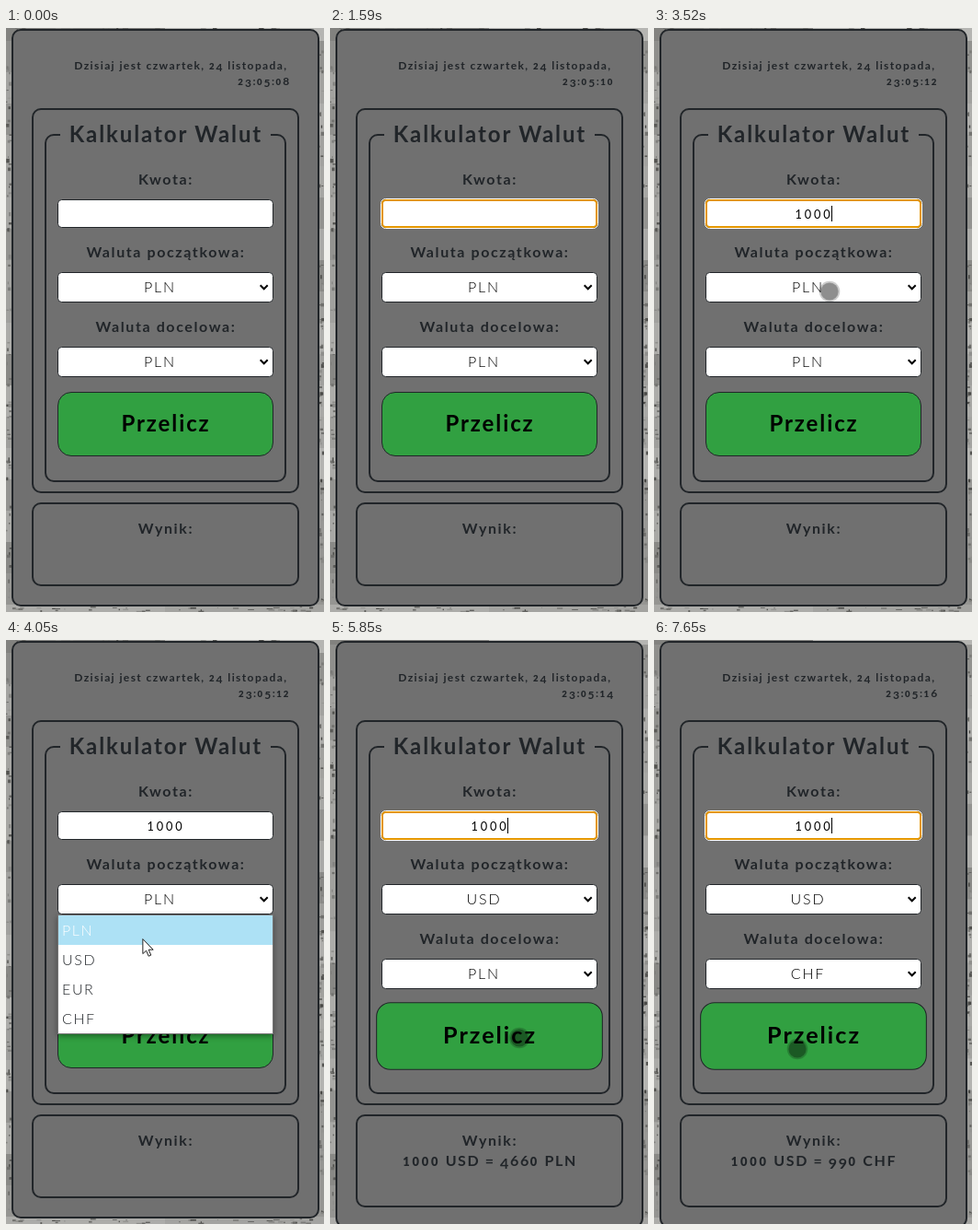
An HTML page for the animation above (8 s loop, 346 by 634 pixels).

```html
<!DOCTYPE html>
<html lang="pl">
<head>
<meta charset="utf-8">
<title>Kalkulator Walut</title>
<style>
html, body { margin: 0; height: 100%; overflow: hidden; background: #999; }
svg { display: block; width: 346px; height: 634px; }
text { font: 700 16px Raleway, Lato, sans-serif; letter-spacing: 1.6px; fill: #212529; text-anchor: middle; }
.date { font-size: 12px; letter-spacing: 1.4px; text-anchor: end; }
.big { font-size: 24px; letter-spacing: 1.9px; }
.val { font-weight: 300; fill: #000; letter-spacing: 1.9px; }
.opt { font-weight: 300; letter-spacing: 1.6px; text-anchor: start; }
/* old-style figures */
.low { font-size: .8em; font-weight: 900; letter-spacing: .22em; }
.val .low { font-weight: 400; }
.drop { baseline-shift: -.19em; }
.box { fill: none; stroke: #212529; stroke-width: 2; }
.field { fill: #fff; stroke: #212529; }
.arrow { fill: none; stroke: #000; stroke-width: 2; }
#list { filter: drop-shadow(0 2px 3px rgba(0, 0, 0, .4)); }
</style>
</head>
<body>
<svg viewBox="0 0 346 634">
  <g id="back"></g>
  <rect id="panel" class="box" style="fill:#707070" x="7" y="2" width="333" height="625" rx="9"/>
  <text class="date" x="306.5" y="45" id="date"></text>
  <text class="date" x="309.5" y="62" id="clock"></text>
  <rect class="box" x="29" y="88" width="289" height="416" rx="9"/>
  <path class="box" d="M59 116H52a9 9 0 0 0-9 9V483a9 9 0 0 0 9 9H295a9 9 0 0 0 9-9V125a9 9 0 0 0-9-9H288"/>
  <text class="big" x="174" y="124">Kalkulator Walut</text>

  <text x="174" y="170">Kwota:</text>
  <rect class="field" x="56.5" y="186.5" width="234" height="30" rx="4"/>
  <g id="focus" fill="none">
    <rect x="55.5" y="185.5" width="236" height="32" rx="5" stroke="#fff"/>
    <rect x="57" y="187" width="233" height="29" rx="3.5" stroke="#e59700" stroke-width="2"/>
  </g>
  <text class="val" x="174" y="207" id="amount"></text>
  <path id="caret" d="M.5 193v17" stroke="#000"/>

  <text x="174" y="249">Waluta początkowa:</text>
  <rect class="field" x="56.5" y="265.5" width="234" height="32" rx="4"/>
  <text class="val" x="167.5" y="287" id="from"></text>
  <path class="arrow" d="M276.7 279.3l4 4 4-4"/>

  <text x="174" y="330">Waluta docelowa:</text>
  <rect class="field" x="56.5" y="346.5" width="234" height="32" rx="4"/>
  <text class="val" x="167.5" y="368" id="to"></text>
  <path class="arrow" d="M276.7 360.3l4 4 4-4"/>

  <g id="button">
    <rect x="56.5" y="395.5" width="234" height="69" rx="14.5" fill="#31a041" stroke="#212529"/>
    <text class="big" x="174" y="438" style="fill:#000">Przelicz</text>
  </g>

  <rect id="resultBox" class="box" x="29" y="516" width="289" height="89" rx="9"/>
  <text x="174" y="549">Wynik:</text>
  <text x="174" y="571" id="result"></text>

  <g id="list">
    <rect x="56.5" y="298.5" width="234" height="129" fill="#fff" stroke="#777"/>
    <rect id="mark" x="57" width="233" height="32" fill="#ade1f5"/>
  </g>

  <g id="cursor">
    <g id="touch">
      <circle r="11.3" fill-opacity=".2"/>
      <circle r="9.6" fill-opacity=".3"/>
    </g>
    <circle id="click" cy="1" r="12" fill="#d8e85c" fill-opacity=".85"/>
    <path id="pointer" d="M.5.5v16l3.7-3.4 2.6 6 2.6-1.1-2.6-5.9h5z" fill="#fff" stroke="#222"/>
  </g>
</svg>
<script>
const LOOP = 8000;
const $ = id => document.getElementById(id);
const CODES = ['PLN', 'USD', 'EUR', 'CHF'];

// Time, x, y of the cursor
const PATH = [
  [200, 301, 300], [390, 250, 225], [590, 250, 222], [850, 154, 207],
  [2180, 154, 306], [2320, 170, 311], [2600, 247, 292], [2980, 191, 286],
  [3650, 191, 286], [4320, 125, 345], [4600, 125, 347], [4920, 125, 347],
  [5350, 206, 432], [5850, 206, 432], [6200, 180, 364], [6400, 180, 364],
  [6900, 122, 486], [7050, 122, 486], [7250, 124, 492], [7510, 124, 492], [7640, 156, 444]
];

const figures = s => s
  .replace(/[012]/g, '<tspan class="low">$&</tspan>')
  .replace(/[34579]/g, '<tspan class="drop">$&</tspan>');

const shown = {};
function put(id, s) {
  if (shown[id] !== s) $(id).innerHTML = figures(shown[id] = s);
}
const show = (id, on) => $(id).setAttribute('visibility', on ? 'visible' : 'hidden');
const set = (id, name, v) => $(id).setAttribute(name, v);
const within = (t, a, b) => t >= a && t < b;
const ramp = (t, a, b) => {
  const p = Math.min(1, Math.max(0, (t - a) / (b - a)));
  return p * p * (3 - 2 * p);
};

function place(t) {
  let i = 0;
  while (i < PATH.length - 2 && t >= PATH[i + 1][0]) i++;
  const a = PATH[i], b = PATH[i + 1], p = ramp(t, a[0], b[0]);
  return [a[1] + (b[1] - a[1]) * p, a[2] + (b[2] - a[2]) * p];
}

// Worn grey print around the panel
function paintBack() {
  let seed = 7, out = '';
  const rnd = n => (seed = seed * 16807 % 2147483647) / 2147483647 * n;
  const bar = (x, y, w, h, g) =>
    out += `<rect x="${x}" y="${y}" width="${w}" height="${h}" fill="rgb(${g},${g},${g - 3})"/>`;
  for (let y = -20; y < 660; y += 34) {
    bar(0, y, 173, 34, 130 + rnd(45));
    bar(173, y, 173, 34, 135 + rnd(50));
  }
  for (let i = 0; i < 150; i++) {
    bar((i % 2 ? 340 : 0) + rnd(4), rnd(660) - 10, 1 + rnd(3), .6 + rnd(4), 70 + rnd(80));
  }
  for (let i = 0; i < 80; i++) {
    bar(rnd(340), i % 2 ? rnd(2) : 628 + rnd(5), 1 + rnd(6), .6 + rnd(1.5), 60 + rnd(90));
  }
  $('back').innerHTML = out;
}

function draw(t) {
  const sec = 8 + Math.floor((t + 820) / 1000);
  put('clock', '23:05:' + String(sec).padStart(2, '0'));

  const typed = [1680, 1820, 1970, 2120].filter(k => t >= k).length;
  put('amount', '1000'.slice(0, typed));
  put('from', t < 4780 ? 'PLN' : 'USD');
  put('to', t < 7450 ? 'PLN' : 'CHF');
  put('result', t < 5400 ? '' : t < 7640 ? '1000 USD = 4660 PLN' : '1000 USD = 990 CHF');

  const focus = within(t, 850, 3650) || within(t, 5400, 6250) || t >= 7640;
  const blinkStart = t >= 7640 ? 7640 : t >= 5400 ? 5430 : t >= 2120 ? 2120 : typed ? 1680 : 880;
  show('focus', focus);
  show('caret', focus && (t - blinkStart) % 1000 < 500);
  set('caret', 'transform', `translate(${173 + Math.round(typed * 5.1)})`);

  const grown = t >= 5400;
  set('panel', 'height', grown ? 635 : 625);
  set('resultBox', 'height', grown ? 99 : 89);
  set('back', 'transform', grown ? 'translate(0 -9) scale(1 1.016)' : '');

  const hover = ramp(t, 5100, 5300) - ramp(t, 5980, 6150) + ramp(t, 7520, 7640);
  set('button', 'transform', `translate(173.5 430) scale(${1 + .05 * hover}) translate(-173.5 -430)`);

  const first = within(t, 3700, 4780), second = within(t, 6300, 7450), open = first || second;
  const [x, y] = place(t);
  const shift = second ? 81 : 0;
  let pick = Math.min(3, Math.max(0, Math.floor((y - shift - 299) / 32)));
  if (second && t < 7050) pick = 0;
  show('list', open);
  set('list', 'transform', `translate(0 ${shift})`);
  set('mark', 'y', 299 + 32 * pick);
  CODES.forEach((c, i) => $(c).style.fill = i === pick ? '#fff' : '#212529');

  show('touch', !open && (within(t, 200, 1320) || t >= 2180));
  show('pointer', open);
  show('click', within(t, 4600, 4780) || within(t, 7330, 7450));
  set('cursor', 'transform', `translate(${x} ${y})`);
}

paintBack();
put('date', 'Dzisiaj jest czwartek, 24 listopada,');
CODES.forEach((c, i) => $('list').insertAdjacentHTML('beforeend',
  `<text class="opt" id="${c}" x="61" y="${321 + 32 * i}">${c}</text>`));

const start = performance.now();
function frame() {
  draw((performance.now() - start) % LOOP);
  requestAnimationFrame(frame);
}
draw(0);
frame();
</script>
</body>
</html>
```
